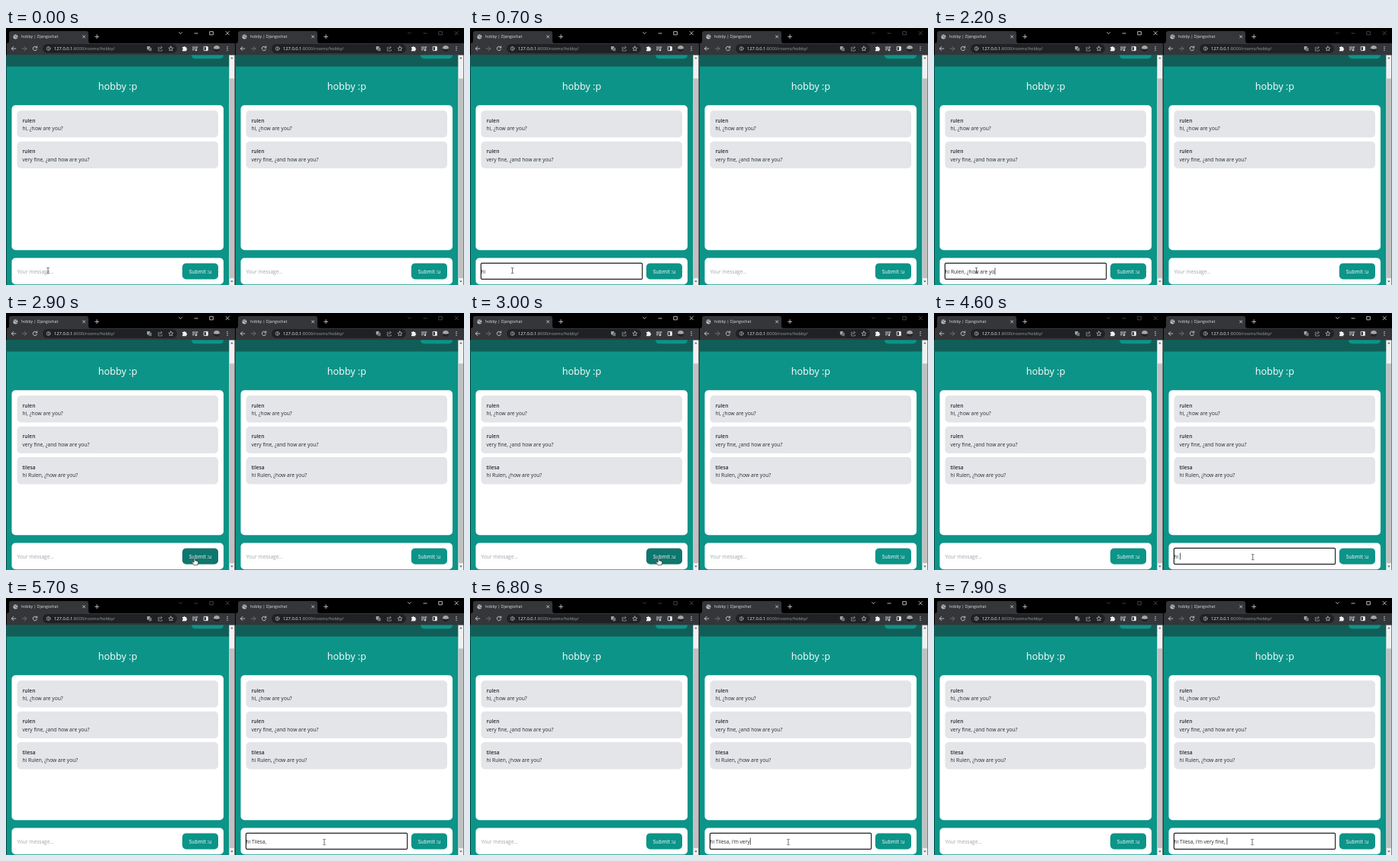
An HTML page that plays this animation: 600x337 px, repeating every 8 s.

```html
<!DOCTYPE html>
<html lang="en">
<head>
<meta charset="utf-8">
<title>Chat rooms</title>
<style>
html, body { margin: 0; width: 100%; height: 100%; overflow: hidden; background: #000; }
svg { display: block; width: 100vw; height: 100vh; }
text { font: 6.6px "Open Sans", "Noto Sans", sans-serif; fill: #262a30; white-space: pre; }
.name { font-weight: 600; }
.body { font-size: 6.7px; }
.tab { font-size: 5.2px; fill: #e3e5e8; }
.choice { font-size: 5.45px; fill: #e3e5e8; }
.url { font-size: 5.75px; fill: #9aa0a6; }
.room { font-size: 12.6px; fill: #fff; text-anchor: middle; }
.button { font-size: 6.7px; font-weight: 500; fill: #fff; text-anchor: middle; }
.hint { fill: #9fa4ad; }
.line { fill: none; stroke: #d5d7da; stroke-width: .85; stroke-linecap: round; stroke-linejoin: round; }
</style>
</head>
<body>
<svg id="stage" viewBox="0 0 600 337" xmlns="http://www.w3.org/2000/svg"></svg>
<script>
const LOOP = 8000;
const SUBMIT = 2850;
const SWITCH = 3550;
const TEAL = '#0d9488', TEAL_DARK = '#0f766e', TEAL_NAV = '#115e59';
const stage = document.getElementById('stage');

const rect = (x, y, w, h, fill, r = 0, extra = '') =>
  `<rect x="${x}" y="${y}" width="${w}" height="${h}" rx="${r}" fill="${fill}" ${extra}/>`;
const text = (x, y, str, cls = '', extra = '') =>
  `<text x="${x}" y="${y}" class="${cls}" ${extra}>${str}</text>`;
const line = (d, extra = '') => `<path class="line" d="${d}" ${extra}/>`;
const dot = (x, y, r, fill) => `<circle cx="${x}" cy="${y}" r="${r}" fill="${fill}"/>`;

function message(y, name, body, extra = '') {
  return `<g ${extra}>` + rect(14.5, y, 263.5, 35.3, '#e4e5e9', 5) +
    text(21.5, y + 15.7, name, 'name') + text(21.5, y + 26.1, body, 'body') + '</g>';
}

function chrome() {
  return rect(0, 0, 300, 36, '#000') +
    `<path d="M1 20Q4 20 4 17V7Q4 4 7 4H105Q108 4 108 7V17Q108 20 111 20H300V35.5H1Z" fill="#35363a"/>` +
    dot(12.4, 11.4, 3, '#b9bdc2') +
    line('M10 10.4Q12 9.4 12 11.2T14.6 12.6M13.4 9.2V10.4', 'style="stroke:#4a4c50;stroke-width:.8"') +
    text(20, 13.3, 'hobby | Djangochat', 'tab') +
    line('M100.5 9.8l3.2 3.2m0-3.2l-3.2 3.2') +
    line('M116.6 11.3h5m-2.5-2.5v5') +
    `<g class="controls">` +
    line('M226.7 5.7l1.9 1.9 1.9-1.9M247 7h4.2M267.2 4.7h4.2v4.2h-4.2zM288 4.5l4.4 4.4m0-4.4l-4.4 4.4',
      'style="stroke:inherit;stroke-width:.75"') + '</g>' +
    line('M12.8 27H7.4m2.5-2.6l-2.6 2.6 2.6 2.6') +
    line('M21.4 27h5.4m-2.5-2.6l2.6 2.6-2.6 2.6', 'style="stroke:#77797d"') +
    line('M40.3 25.4A2.7 2.7 0 1 0 40.6 27.8M40.7 24v1.9h-1.9') +
    rect(48, 21.1, 176, 12, '#202124', 6) +
    `<circle class="line" cx="55.6" cy="27" r="2.4" style="stroke-width:.6"/>` +
    line('M55.6 26.8v1.4m0-2.7v.1', 'style="stroke-width:.7"') +
    text(63, 29.1, '<tspan fill="#f1f3f4">127.0.0.1</tspan>:8000/rooms/hobby/', 'url') +
    rect(184.8, 24, 3.9, 4.4, '#a4a7ab', .6) + rect(187, 25.8, 3.8, 4.4, '#6f7276', .6) +
    line('M201 25.4h-1.4v4.6h4.8v-1.6M201 27.8Q201.4 25.6 204 25.5m-1.2-1.4l1.7 1.4-1.7 1.4', 'style="stroke:#a4a7ab;stroke-width:.65"') +
    line('M216 24l.9 2 2.2.2-1.7 1.5.5 2.2-1.9-1.2-1.9 1.2.5-2.2-1.7-1.5 2.2-.2z', 'style="stroke-width:.65"') +
    `<path d="M231 25.1h1.6a1 1 0 0 1 2 0h1.7v1.7a1 1 0 0 1 0 2v1.5H231v-1.7a1 1 0 0 0 0-2z" fill="#f0f1f2"/>` +
    line('M244.4 25h4m-4 1.9h4m-4 1.9h2M249.8 24.9v4.2m0-4.2h1.2') + dot(248.9, 29.2, 1.1, '#d5d7da') +
    rect(259.2, 24.4, 5.2, 5.2, 'none', .5, 'stroke="#e8eaed" stroke-width=".9"') + rect(262, 24.4, 2.4, 5.2, '#e8eaed') +
    dot(276, 27, 4, '#222325') + `<path d="M272 27A4 4 0 0 1 280 27Q276 28.4 272 27Z" fill="#a9a6a2"/>` +
    [24.7, 27, 29.3].map(y => dot(290, y, .65, '#e8eaed')).join('');
}

function page() {
  return rect(.5, 35.5, 292.5, 302, TEAL) + rect(.5, 35.5, 292.5, 15, TEAL_NAV) +
    `<path d="M243 35.5Q243.5 40.3 248 40.3H280Q284.5 40.3 285 35.5Z" fill="${TEAL}"/>` +
    rect(292.3, 35.5, 7.2, 302, '#f1f1f1') + rect(292.8, 66.3, 6.2, 261.7, '#c1c1c1') +
    `<path d="M294.2 40.2l1.7-2 1.7 2zM294.2 331.6l1.7 2 1.7-2z" fill="#555"/>` +
    text(146.3, 81, 'hobby :p', 'room') +
    rect(7.5, 101.3, 277.5, 189.9, '#fff', 5) +
    message(108.2, 'rulen', 'hi, ¿how are you?') +
    message(148.7, 'rulen', 'very fine, ¿and how are you?') +
    message(189.1, 'tilesa', 'hi Rulen, ¿how are you?', 'class="sent"') +
    rect(7.5, 301.5, 277.5, 34.8, '#fff', 5) +
    rect(14.4, 308.4, 211.3, 20.9, '#fff', 1.4, 'class="ring" stroke="#202327" stroke-width="1.2"') +
    text(14.5, 321.7, 'Your message...', 'hint') +
    text(14.5, 321.7, '', 'typed') +
    rect(0, 314.5, .7, 9, '#111', 0, 'class="caret"') +
    rect(231, 308.4, 47, 21, TEAL, 5, 'class="submit"') +
    text(254.6, 321.7, 'Submit :u', 'button');
}

const win = (id, x) => `<g id="${id}" transform="translate(${x} 0)">${chrome()}${page()}</g>`;

stage.innerHTML = rect(0, 0, 600, 337, '#0b0c0d') + win('left', 0) + win('right', 300) +
  `<g id="popup"><path d="M360 269H393Q395 269 395 271V302Q395 304 393 304H371L367.3 308 363.5 304H360Q358 304 358 302V271Q358 269 360 269Z" fill="#28292c"/>` +
  text(363, 281.4, 'a', 'choice') + text(363, 297.2, 'hello :D', 'choice') + '</g>' +
  `<g id="cursor">
    <path id="beam" d="M-1.7-3.6H-.5L0-3.2.5-3.6H1.7M0-3.2V3.2M-1.7 3.6H-.5L0 3.2.5 3.6H1.7" fill="none" stroke="#333" stroke-width=".7"/>
    <path id="arrow" d="M0 0V8L1.9 6.3 3.2 9.1 4.4 8.5 3.1 5.9H5.6Z" fill="#fff" stroke="#111" stroke-width=".6"/>
    <path id="hand" d="M-.8 0Q0-1 .8 0V3.2L4 4Q5 4.4 4.8 5.6L4 9H-.8L-3.3 5.6Q-3 4.2-.8 5.4Z" fill="#fff" stroke="#111" stroke-width=".6"/>
  </g>`;

const $ = id => document.getElementById(id);
const show = (el, on) => el.setAttribute('visibility', on ? 'visible' : 'hidden');

// Each burst: number of keys, time of the first, gap between keys.
const keyTimes = bursts => bursts.flatMap(([n, start, gap]) =>
  Array.from({ length: n }, (_, i) => start + i * gap));

function panel(id, script, bursts) {
  const root = $(id);
  const part = cls => root.querySelector('.' + cls);
  return {
    script, keys: keyTimes(bursts),
    controls: part('controls'), sent: part('sent'), ring: part('ring'), hint: part('hint'),
    typed: part('typed'), caret: part('caret'), submit: part('submit')
  };
}

const left = panel('left', 'hi Rulen, ¿how are you?', [[2, 300, 100], [19, 800, 76], [2, 2300, 100]]);
const right = panel('right', "hi Tilesa, i'm very fine, ",
  [[9, 4400, 100], [1, 5300, 0], [5, 5800, 140], [4, 6600, 65], [5, 7000, 95], [2, 7600, 150]]);

function drawPanel(p, t, focused, active) {
  const count = focused ? p.keys.filter(k => k <= t).length : 0;
  p.typed.textContent = p.script.slice(0, count);
  show(p.hint, count === 0);
  show(p.ring, focused);
  show(p.caret, count > 0 && t - p.keys[count - 1] < 200);
  p.caret.setAttribute('x', 14.8 + (count ? p.typed.getComputedTextLength() : 0));
  show(p.sent, t >= SUBMIT);
  p.controls.setAttribute('stroke', active ? '#f1f3f4' : '#55575b');
}

// Pointer stops: time, x, y.
const stops = [[0, 55, 318], [200, 55.5, 318], [2450, 55.5, 318], [2780, 247, 321.5],
  [3100, 247, 321.5], [3500, 417.7, 320], [5600, 417.7, 320], [5700, 417, 320], [LOOP, 417, 320]];

function pointer(t) {
  const next = stops.findIndex(s => t < s[0]);
  const [t0, x0, y0] = stops[next - 1], [t1, x1, y1] = stops[next];
  const u = (t - t0) / (t1 - t0), e = u * u * (3 - 2 * u);
  return [x0 + (x1 - x0) * e, y0 + (y1 - y0) * e];
}

function draw(t) {
  const onRight = t >= SWITCH;
  drawPanel(left, t, t >= 150 && t < SUBMIT, !onRight);
  drawPanel(right, t, onRight, onRight);
  show($('popup'), t >= SWITCH + 50 && t < 4400);

  const [x, y] = pointer(t);
  const lx = x % 300;
  const overInput = lx > 14 && lx < 226, overButton = lx > 231 && lx < 278;
  $('cursor').setAttribute('transform', `translate(${x} ${y})`);
  show($('beam'), overInput);
  show($('hand'), overButton);
  show($('arrow'), !overInput && !overButton);
  left.submit.setAttribute('fill', overButton && x < 300 ? TEAL_DARK : TEAL);
}

function tick() {
  draw(performance.now() % LOOP);
  requestAnimationFrame(tick);
}
tick();
</script>
</body>
</html>
```
